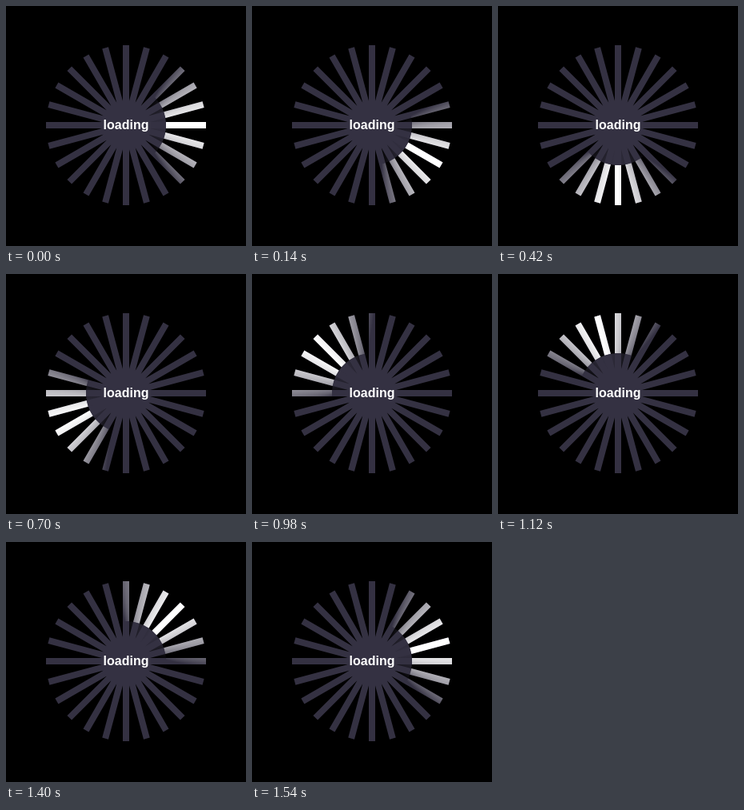
Write an HTML page with a canvas that moves like this. It is 300 by 300 pixels and loops after 1610 ms.

```html
<!DOCTYPE html>
<html lang="en">
<head>
<meta charset="utf-8">
<title>Loading</title>
<style>
  html, body { margin: 0; width: 100%; height: 100%; overflow: hidden; background: #000; }
  canvas { display: block; width: 300px; height: 300px; }
  p {
    position: absolute; left: 0; top: 139px; width: 300px; margin: 0;
    font: bold 16px/20px "Liberation Sans", Arial, sans-serif;
    text-align: center; color: #fff;
  }
</style>
</head>
<body>
<canvas id="stage" width="300" height="300"></canvas>
<p>loading</p>
<script>
const STEP = 70, STEPS = 23, SPOKES = 24;
const CX = 150, CY = 149, INNER = 50, OUTER = 100, APEX = 15;
const BASE = '#343142';
const TAU = Math.PI * 2;
// Beam opacity by angle, in degrees from its axis
const FALLOFF = [[0, 1], [4, 1], [20, 0.82], [38, 0.54], [52, 0.24], [60, 0]];

const ctx = document.getElementById('stage').getContext('2d');

function spokes(from, to) {
  const path = new Path2D();
  for (let i = 0; i < SPOKES; i++) {
    const bar = new Path2D();
    bar.rect(from, -4, to - from, 8);
    path.addPath(bar, new DOMMatrix().rotate(i * 360 / SPOKES));
  }
  return path;
}

function beam(rgb) {
  const g = ctx.createConicGradient(Math.PI, APEX, 0);
  for (const [deg, a] of FALLOFF) {
    const color = `rgba(${rgb},${a})`;
    g.addColorStop(0.5 - deg / 360, color);
    g.addColorStop(0.5 + deg / 360, color);
  }
  return g;
}

const wheel = spokes(0, OUTER);
const tips = spokes(INNER, OUTER);
const hub = new Path2D();
hub.arc(0, 0, INNER, 0, TAU);

function draw(step) {
  const turn = step / STEPS * TAU;
  ctx.setTransform(1, 0, 0, 1, 0, 0);
  ctx.fillStyle = '#000';
  ctx.fillRect(0, 0, 300, 300);
  ctx.translate(CX, CY);
  ctx.fillStyle = BASE;
  ctx.fill(wheel);

  ctx.save();
  ctx.clip(tips);
  ctx.rotate(turn);
  ctx.fillStyle = beam('255,255,255');
  ctx.fillRect(-OUTER, -OUTER, OUTER * 2, OUTER * 2);
  ctx.restore();

  ctx.save();
  ctx.rotate(turn);
  ctx.fillStyle = beam('52,49,66');
  ctx.fill(hub);
  ctx.restore();
}

function tick() {
  draw(Math.floor(performance.now() / STEP) % STEPS);
  requestAnimationFrame(tick);
}
tick();
</script>
</body>
</html>
```
